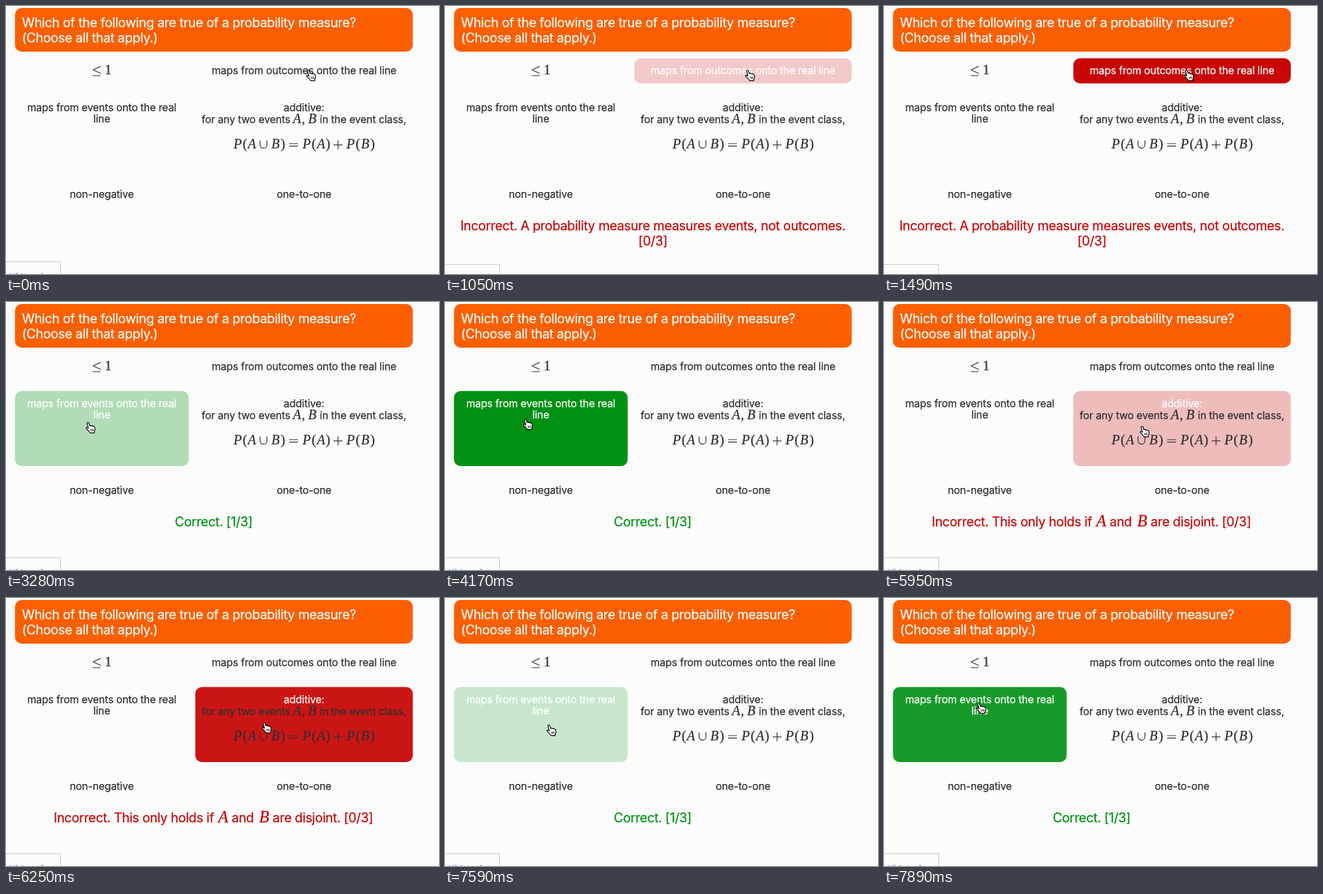
These frames come from a looping animation (653 by 405 pixels, 8 s). An HTML page with a canvas:

```html
<!DOCTYPE html>
<html lang="en">
<head>
<meta charset="utf-8">
<title>Probability quiz</title>
<style>
  html, body { margin: 0; width: 100%; height: 100%; overflow: hidden; background: #fcfcfc; }
  canvas { display: block; width: 653px; height: 405px; }
</style>
</head>
<body>
<canvas id="stage"></canvas>
<script>
const W = 653, H = 405, LOOP = 8000, FADE = 600;
const canvas = document.getElementById('stage');
const ctx = canvas.getContext('2d');
const dpr = window.devicePixelRatio || 1;
canvas.width = W * dpr;
canvas.height = H * dpr;

const PAPER = '#fcfcfc', INK = '#303030', WHITE = '#fff', RED = '#c80606', GREEN = '#009014';
const SANS = 'Inter, "Open Sans", sans-serif';
const SERIF = '"Liberation Serif", serif';
const BODY = { size: 15.6, track: '-0.13px' };
const LARGE = { size: 19.5, track: '-0.32px' };

// The picture refreshes in bursts: first time, last time, number of steps
const BURSTS = [[900, 1490, 5], [2530, 2980, 4], [3280, 3720, 4], [4170, 5350, 9],
  [5800, 6400, 5], [6690, 7140, 4], [7590, 7890, 3]];
const ticks = [0];
for (const [from, to, n] of BURSTS)
  for (let i = 0; i < n; i++)
    ticks.push(Math.round((from + (to - from) * i / (n - 1)) / 10) * 10);

// Each click: when it shows, when its fade began, which box
const CLICKS = [
  { at: 900, start: 870, box: 'outcomes' },
  { at: 3280, start: 3059, box: 'events' },
  { at: 5800, start: 5746, box: 'additive' },
  { at: 7590, start: 7410, box: 'events' }
];
const BOXES = {
  outcomes: [285.5, 79, 328, 38, RED],
  events: [13.5, 134.5, 262, 113.5, GREEN],
  additive: [285.5, 134.5, 328, 113.5, RED]
};

// Pointer path: time, left, top
const PATH = [
  [0, 452, 96], [2400, 452, 96], [2980, 119.5, 181],
  [4020, 119.5, 181], [4170, 117, 176], [4320, 116, 160], [4470, 121, 135], [4620, 144, 112],
  [4760, 179, 110], [4910, 219, 120], [5060, 284, 150], [5200, 341, 181], [5350, 385, 187],
  [6560, 385, 187], [7140, 152.5, 191],
  [7590, 152.5, 191], [7890, 138.5, 157.5], [LOOP, 138.5, 157.5]
];
const HAND = new Path2D('M2.6 2.2C2.4 .8 4.6 .4 5.1 1.9L6.5 6C7.2 5.2 8.5 5.3 8.9 6.3' +
  'C9.6 5.6 10.8 5.8 11.2 6.9C12 6.5 13.1 6.9 13.3 8C13.7 9.8 13.9 11 13.4 12.6' +
  'L12.6 14.6L12.7 16.2L6.8 16.2C6.2 14.8 4.4 13.2 3.4 12C2.4 10.8 1 9.6 1.2 8.9' +
  'C1.6 7.9 3 8.2 4.4 9.6Z');
const FINGERS = new Path2D('M7.6 10.4l.4 3.2M9.4 10.3l.2 3.2M11.2 10.2v3.2');

const swing = p => 0.5 - Math.cos(Math.PI * Math.min(1, Math.max(0, p))) / 2;

// Fills glyphs with a hairline outline for slightly heavier stems
function glyphs(str, x, y, color, weight) {
  ctx.fillStyle = ctx.strokeStyle = color;
  ctx.lineWidth = weight;
  ctx.lineJoin = 'round';
  ctx.fillText(str, x, y);
  ctx.strokeText(str, x, y);
}

function text(str, x, y, style, color, align = 'center') {
  ctx.font = `${style.size}px ${SANS}`;
  ctx.letterSpacing = style.track;
  ctx.textAlign = align;
  glyphs(str, x, y, color, 0.25);
}

function panel(x, y, w, h, color, alpha = 1) {
  ctx.globalAlpha = alpha;
  ctx.fillStyle = color;
  ctx.beginPath();
  ctx.roundRect(x, y, w, h, 10);
  ctx.fill();
  ctx.globalAlpha = 1;
}

// Advance widths and operator strokes of the formula, in em
const ADVANCE = { P: 0.781, A: 0.75, B: 0.809, '(': 0.389, ')': 0.389, '1': 0.5, ',': 0.278,
  ' ': 0.167, '∪': 1.111, '=': 1.334, '+': 1.222, '≤': 1.056 };
const SIGNS = {
  '∪': 'M.28-.58V-.24C.28 .1 .83 .1 .83-.24V-.58',
  '=': 'M.334-.347H1M.334-.153H1',
  '+': 'M.278-.25H.944M.611-.583V.083',
  '≤': 'M.69-.62L.1-.343L.69-.066M.1 .12H.69'
};

function formula(str, x, y, em, color) {
  ctx.letterSpacing = '0px';
  ctx.textAlign = 'center';
  for (const ch of str) {
    const adv = ADVANCE[ch] * em;
    if (SIGNS[ch]) {
      ctx.save();
      ctx.translate(x, y);
      ctx.scale(em, em);
      ctx.strokeStyle = color;
      ctx.lineWidth = 1.2 / em;
      ctx.lineCap = 'round';
      ctx.stroke(new Path2D(SIGNS[ch]));
      ctx.restore();
    } else {
      ctx.font = `${/[A-Z]/.test(ch) ? 'italic ' : ''}${em * 1.08}px ${SERIF}`;
      glyphs(ch, x + adv / 2, y, color, 0.3);
    }
    x += adv;
  }
}

function pointer(t) {
  let i = 1;
  while (PATH[i][0] < t) i++;
  const [t0, x0, y0] = PATH[i - 1], [t1, x1, y1] = PATH[i];
  const p = (t - t0) / (t1 - t0);
  const k = t1 - t0 > 500 ? swing(p) : p;
  ctx.save();
  ctx.translate(x0 + (x1 - x0) * k, y0 + (y1 - y0) * k);
  ctx.scale(1.08, 1.04);
  ctx.lineWidth = 1.1;
  ctx.lineJoin = 'round';
  ctx.strokeStyle = '#000';
  ctx.fillStyle = WHITE;
  ctx.fill(HAND);
  ctx.stroke(HAND);
  ctx.lineWidth = 0.8;
  ctx.stroke(FINGERS);
  ctx.restore();
}

function feedback(box) {
  if (box === 'outcomes') {
    text('Incorrect. A probability measure measures events, not outcomes.', 313.5, 338.5, LARGE, RED);
    text('[0/3]', 313.5, 362, LARGE, RED);
  } else if (box === 'events') {
    text('Correct. [1/3]', 313.2, 338.5, LARGE, GREEN);
  } else if (box === 'additive') {
    text('Incorrect. This only holds if', 72, 338.5, LARGE, RED, 'left');
    formula('A', 319, 338.5, 23, RED);
    text('and', 357, 338.5, LARGE, RED);
    formula('B', 380, 338.5, 23, RED);
    text('are disjoint. [0/3]', 553.5, 338.5, LARGE, RED, 'right');
  }
}

function footer(shift) {
  const y = 386.5 + shift;
  ctx.fillStyle = PAPER;
  ctx.strokeStyle = '#c8c8c8';
  ctx.lineWidth = 1;
  ctx.beginPath();
  ctx.rect(-5.5, y, 88, 40);
  ctx.fill();
  ctx.stroke();
  text('Hide quiz', 5, y + 27, { size: 13, track: '0px' }, '#1688d0', 'left');
}

function draw(t) {
  ctx.setTransform(dpr, 0, 0, dpr, 0, 0);
  ctx.fillStyle = PAPER;
  ctx.fillRect(0, 0, W, H);

  const click = CLICKS.filter(c => c.at <= t).pop();
  const box = click ? click.box : '';
  const tint = name => name === box ? WHITE : INK;

  panel(13.5, 3, 600, 66, '#fb5f02');
  text('Which of the following are true of a probability measure?', 24, 31.5, LARGE, WHITE, 'left');
  text('(Choose all that apply.)', 24, 54.5, LARGE, WHITE, 'left');

  if (click) panel(...BOXES[box], swing((t - click.start) / FADE));

  formula('≤1', 129.5, 103, 18.72, INK);
  text('maps from outcomes onto the real line', 449.5, 103, BODY, tint('outcomes'));
  text('maps from events onto the real', 144.5, 158.5, BODY, tint('events'));
  text('line', 144.5, 176, BODY, tint('events'));
  text('additive:', 449.5, 158.5, BODY, tint('additive'));
  text('for any two events', 295, 176.5, BODY, INK, 'left');
  formula('A, B', 432, 176.5, 18.72, INK);
  text('in the event class,', 603.5, 176.5, BODY, INK, 'right');
  formula('P(A∪B)=P(A)+P(B)', 342, 214.5, 18.72, INK);
  text('non-negative', 144.5, 289.5, BODY, INK);
  text('one-to-one', 449.5, 289.5, BODY, INK);

  feedback(box);
  footer(box === 'outcomes' ? 4 : 0);
  pointer(t);
}

function loop() {
  const now = performance.now() % LOOP;
  draw(ticks.filter(t => t <= now).pop());
  requestAnimationFrame(loop);
}
loop();
</script>
</body>
</html>
```
